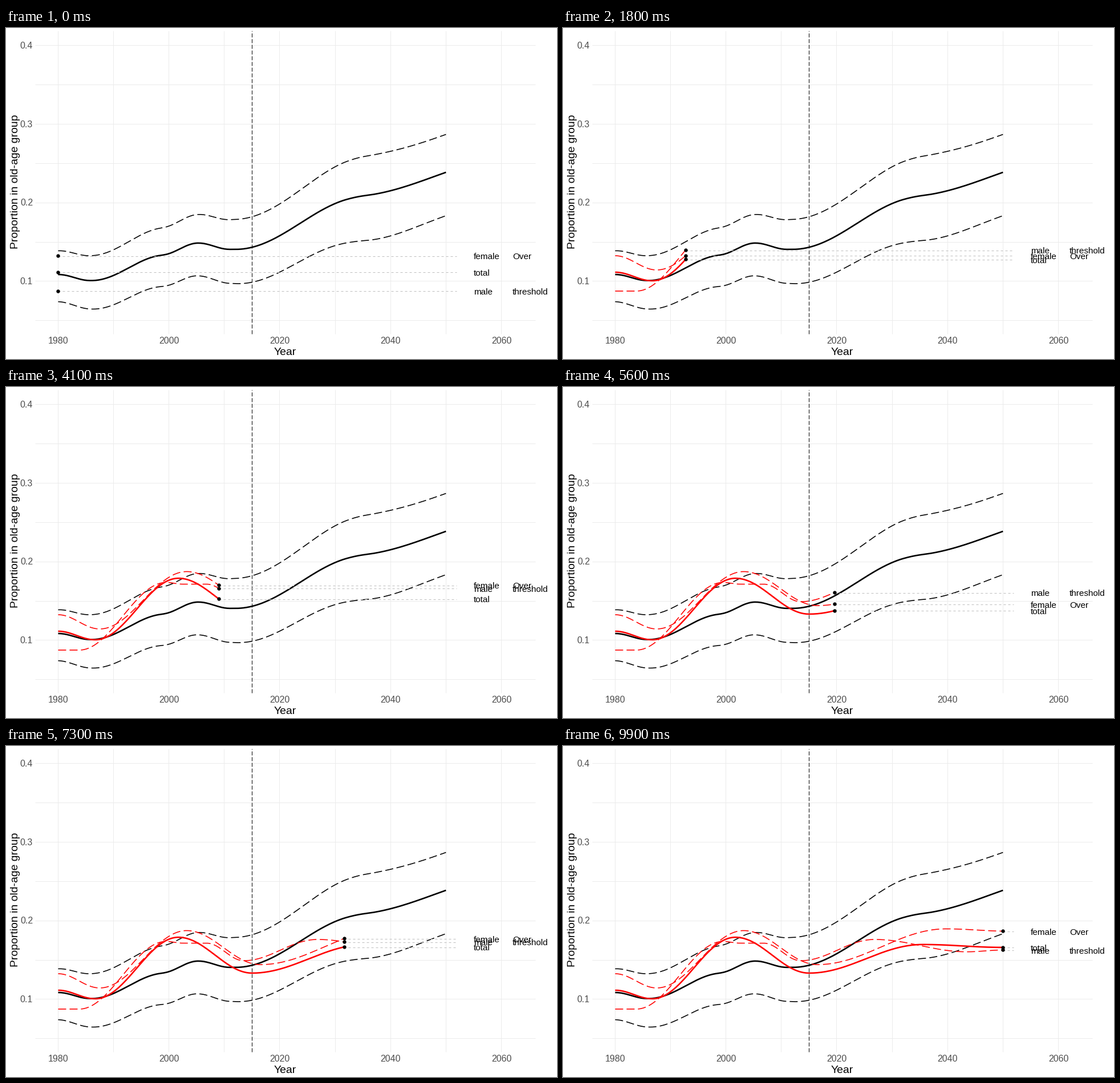
Recreate the animation shown at these times as a matplotlib script. Size 966 px wide and 580 px high, loop 10 s.

```python
import numpy as np
import matplotlib.pyplot as plt
from matplotlib.animation import FuncAnimation

W, H, DPI = 966, 580, 100
FRAMES = 100
PX = 72 / DPI                      # one pixel in points
X0, SX = 91.45, 9.7125             # pixel of 1980, pixels per year
Y0, SY = 442.95, 1376.7            # pixel of 0.1, pixels per unit
BLACK, GRID, GUIDE, TICK = "black", "#EBEBEB", "#BEBEBE", "#4D4D4D"

plt.rcParams["font.family"] = "Liberation Sans"


def year_at(px):
    return 1980 + (px - X0) / SX


def prop_at(px):
    return 0.1 + (Y0 - px) / SY


def steps(start, *moves):
    """Curve in thousandths: a start level plus cosine-eased rises and falls."""
    def curve(x):
        y = np.full_like(x, start)
        for a, b, change in moves:
            u = np.clip((x - a) / (b - a), 0, 1)
            y += change * (1 - np.cos(np.pi * u)) / 2
        return y / 1000
    return curve


def gap(x):
    """Distance between the overall share and the upper curve."""
    return (30.2 + 0.245 * (x - 1980) + 6.2 * np.exp(-((x - 2036) / 10) ** 2)) / 1000


share = steps(108.0, (1980, 1985.8, -7.7), (1986, 1999.5, 32.5),
              (1998.5, 2005.3, 15.2), (2005.3, 2011, -8),
              (2012, 2035.5, 67), (2032, 2064, 52))
moving = {
    "female": steps(131.9, (1980, 1987.5, -18.1), (1987.5, 2003.2, 73),
                    (2003.2, 2016.5, -43.3), (2016.5, 2039.7, 45.5),
                    (2039.7, 2051, -3)),
    "total": steps(110.9, (1980, 1986.7, -10.9), (1986.7, 2001.7, 78.3),
                   (2001.7, 2015, -45.6), (2015, 2035.5, 36.4),
                   (2035.5, 2050, -3.7)),
    "male": steps(86.9, (1983.8, 1999.5, 86.1), (1999.5, 2002.5, -2.2),
                  (2006.8, 2013.5, -22.3), (2013.5, 2026.8, 27),
                  (2026.8, 2043.5, -15.7), (2043.5, 2050, 2.3)),
}
notes = {"female": "Over", "total": "", "male": "threshold"}

fig = plt.figure(figsize=(W / DPI, H / DPI), dpi=DPI, facecolor="white")
ax = fig.add_axes([0, 0, 1, 1])
ax.axis("off")
ax.set_xlim(year_at(0), year_at(W))
ax.set_ylim(prop_at(H), prop_at(0))
left, right = year_at(51), year_at(928)
bottom, top = prop_at(535), prop_at(5)


def line(x, y, color, px, dash=None, z=2):
    """Line with width and dash lengths in pixels."""
    style = (0, tuple(d / px for d in dash)) if dash else "-"
    return ax.plot(x, y, color=color, lw=px * PX, ls=style, zorder=z,
                   solid_capstyle="butt")[0]


def ends(x, y):
    """Shift by half a pixel so that snapping keeps the nearest row and column."""
    return np.array(x) - 0.5 / SX, np.array(y) - 0.5 / SY


def text(x, y, s, px, color=BLACK, va="baseline", **kw):
    return ax.text(x, y, s, fontsize=px * PX, color=color, va=va, zorder=6, **kw)


def solid(x, y, color, z=2):
    return line(x, y, color, 2.6, z=z)


def dashed(x, y, color, z=2):
    return line(x, y, color, 1.6, (14, 6), z)


# Grid and axis labels
for year in range(1980, 2061, 10):
    line(*ends([year, year], [bottom, top]), GRID, 1, z=1)
    if year % 20 == 0:
        text(year, prop_at(553), str(year), 16, TICK, ha="center")
for k in range(1, 9):
    p = k / 20
    line(*ends([left, right], [p, p]), GRID, 1, z=1)
    if k % 2 == 0:
        text(year_at(47), p - 6 / SY, f"{p:.1f}", 16, TICK, ha="right")
text(year_at(489), prop_at(573), "Year", 19.4, ha="center")
text(year_at(24.8), prop_at(269), "Proportion in old-age group", 19.4,
     ha="right", va="center", rotation=90)

# Fixed curves
xs = np.linspace(1980, 2050, 281)
solid(xs, share(xs), BLACK)
for side in (1, -1.145):
    dashed(xs, share(xs) + side * gap(xs), BLACK)
line(*ends([2015, 2015], [bottom, top]), BLACK, 1, (7, 3), z=3)

# Revealed curves with guide, dot and labels
parts = {}
for name in moving:
    draw = solid if name == "total" else dashed
    parts[name] = (
        draw([], [], "red", z=3),
        line([], [], GUIDE, 1, (4, 4), z=4),
        ax.plot([], [], "o", ms=6.4 * PX, mew=0, color=BLACK, zorder=5)[0],
        text(2055, 0, name, 15.3),
        text(2062, 0, notes[name], 15.3),
    )


def update(i):
    now = 1980 + 70 * i / (FRAMES - 1)
    x = np.append(np.arange(1980, now, 0.25), now)
    for name, (path, guide, dot, *labels) in parts.items():
        y = moving[name](x)
        end = y[-1]
        path.set_data(x, y)
        guide.set_data(*ends([now, 2052], [end, end]))
        dot.set_data([now], [end])
        for label in labels:
            label.set_y(end - 6.2 / SY)
    return [p for group in parts.values() for p in group]


anim = FuncAnimation(fig, update, frames=FRAMES, interval=100, repeat=True,
                     repeat_delay=0, blit=False)
plt.show()
```
